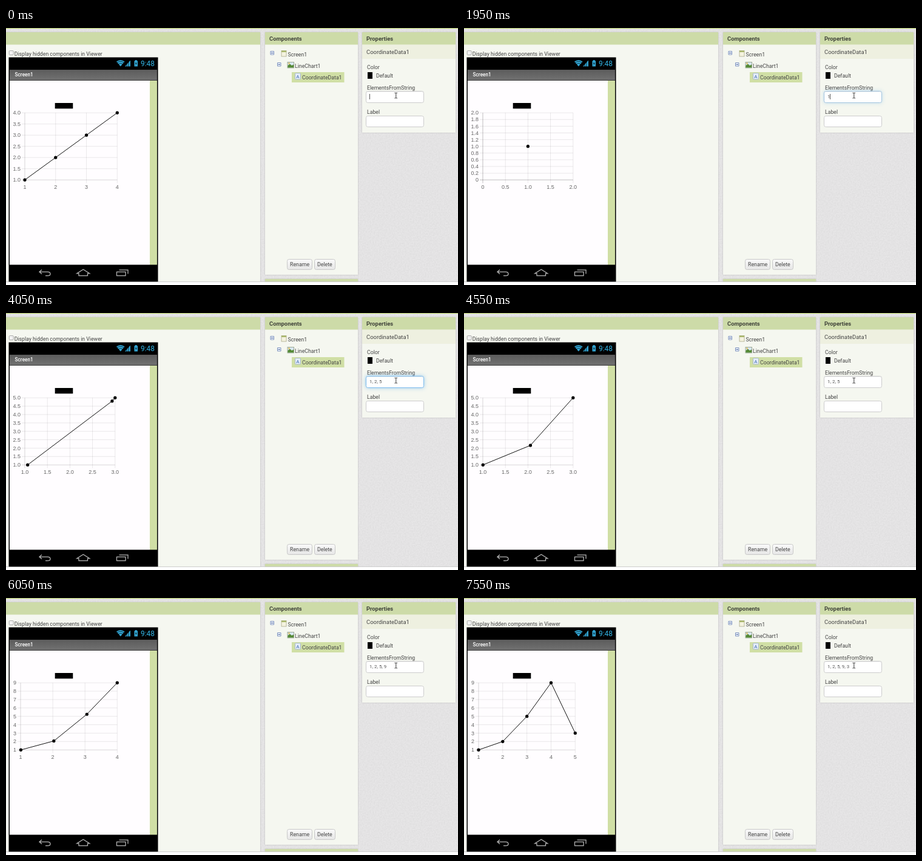
Write an HTML page that moves like this. It is 745x425 px and loops after 8 s.

```html
<!DOCTYPE html>
<html lang="en">
<head>
<meta charset="utf-8">
<title>Line chart designer</title>
<style>
  html, body { margin: 0; width: 100%; height: 100%; overflow: hidden; background: #fff; }
  svg { position: absolute; left: 0; top: 0; }
  text { font: 8.72px Roboto, sans-serif; fill: #444; }
  text.head { font-size: 9.4px; font-weight: 700; fill: #40433a; }
  #chart text { font: 9px "Liberation Sans", Arial, sans-serif; fill: #666; }
  .field {
    position: absolute; left: 593px; width: 96px; height: 19.5px; box-sizing: border-box;
    padding-left: 5px; border: 1px solid #ccc; border-radius: 3.5px; background: #fff;
    font: 7.9px/17.5px Roboto, sans-serif; color: #555; white-space: pre;
  }
  #caret { display: inline-block; width: 0; height: 9px; margin-right: -1px; border-left: 1px solid #555; vertical-align: -1.5px; }
</style>
</head>
<body>
<svg width="745" height="425" viewBox="0 0 745 425">
  <defs>
    <filter id="grain" x="0" y="0" width="100%" height="100%">
      <feTurbulence type="fractalNoise" baseFrequency=".45" numOctaves="2" seed="4"/>
      <feColorMatrix values="0 0 0 0 .4  0 0 0 0 .4  0 0 0 0 .4  .25 0 0 0 -.07"/>
    </filter>
    <filter id="soft" x="-10%" y="-10%" width="120%" height="120%"><feGaussianBlur stdDeviation="1.3"/></filter>
    <linearGradient id="button" x2="0" y2="1"><stop stop-color="#fafafa"/><stop offset="1" stop-color="#e6e6e6"/></linearGradient>
    <linearGradient id="titlebar" x2="0" y2="1"><stop stop-color="#5c5c5c"/><stop offset="1" stop-color="#717171"/></linearGradient>
  </defs>

  <rect width="745" height="420" fill="#e7e6e7"/>
  <rect width="745" height="420" filter="url(#grain)"/>
  <rect width="745" height="1" fill="#b5cf5f"/>
  <g id="panels"></g>
  <path d="M0 419.7H745" stroke="#c9c9c9"/>
  <rect y="420.3" width="745" height="5" fill="#fff"/>

  <rect x="5.2" y="37.6" width="7" height="7" rx="1.2" fill="#f2f2f2" stroke="#999" stroke-width=".8"/>
  <text x="13.7" y="46.1">Display hidden components in Viewer</text>

  <g id="phone">
    <rect x="4.5" y="48.5" width="246" height="371" fill="#000"/>
    <rect x="6" y="69" width="243" height="17.5" fill="url(#titlebar)"/>
    <text x="14.6" y="80.2" style="font-size:8.2px;font-weight:500;fill:#fff">Screen1</text>
    <rect x="6" y="87" width="231" height="304.5" fill="#fffdff"/>
    <rect x="237" y="87" width="12" height="304.5" fill="#d0dfa5"/>
    <g fill="#33a9d8">
      <path d="M182 55.5Q188.7 50.5 195.5 55.5L188.8 63.5Z"/>
      <path d="M196 63.5H205V53.5Z"/>
      <path d="M211.5 54.3H213V53H215.5V54.3H217V63.5H211.5Z"/>
    </g>
    <path d="M183 57.3Q188.7 53.3 194.5 57.3M185 59.8Q188.7 57 192.5 59.8M199 54V64M202 54V64" fill="none" stroke="#000" stroke-width=".7"/>
    <path d="M214.8 55.5L213 59H214.2L213.5 62L215.7 58.3H214.3Z" fill="#000"/>
    <text x="222" y="62.8" style="font-size:11.9px;fill:#33b5e5">9:48</text>
    <g fill="none" stroke="#b4b4b4" stroke-width="1.3">
      <path d="M59 399.8L55 403.3L59 406.8M55.5 403.3H69Q73 403.3 73 406.5T69 409.7H65"/>
      <path d="M117 405.8L127.3 399.3L137.6 405.8H134.5V409.6H120V405.8Z"/>
      <path d="M182.5 403.3H197V409.7H182.5ZM186.5 400.2H201V406.5"/>
    </g>
  </g>
  <rect x="80.7" y="124" width="29.6" height="9.3"/>
  <g id="chart"></g>

  <g id="tree">
    <rect x="471" y="73" width="86.5" height="17" fill="#d0dfa5"/>
    <g fill="#f4f7ff" stroke="#7d92bd">
      <path d="M436 38.5h5.5v5.5h-5.5zM447.5 57.5h5.5v5.5h-5.5z"/>
      <path d="M437 41.3h3.5M448.5 60.3h3.5" stroke="#31528f"/>
    </g>
    <rect x="454" y="37.5" width="8" height="9.5" fill="#f4f3df" stroke="#aaa88b" stroke-width=".8"/>
    <rect x="454" y="37.5" width="8" height="2.4" fill="#a8b66a"/>
    <rect x="464" y="56.5" width="10.5" height="9.5" fill="#d9e7f2" stroke="#8a9a80" stroke-width=".8"/>
    <path d="M464.4 65.6V62L468 59.5L471 62L474 60.5V65.6Z" fill="#558a36"/>
    <circle cx="466.5" cy="58.5" r="1.2" fill="#e7bd4b"/>
    <rect x="476.5" y="74.8" width="9" height="10" rx="1" fill="#e5edf9" stroke="#9eafca" stroke-width=".8"/>
    <text x="478.3" y="82.8" style="font-size:8px;fill:#3865af">A</text>
    <text x="464.6" y="46.7">Screen1</text>
    <text x="476" y="65.7">LineChart1</text>
    <text x="488" y="85.4">CoordinateData1</text>
  </g>

  <g fill="url(#button)" stroke="#c8c8c8">
    <rect x="463.5" y="382.5" width="41" height="17" rx="3"/>
    <rect x="508.5" y="382.5" width="34" height="17" rx="3"/>
  </g>
  <text x="468" y="394" style="font-size:8.8px">Rename</text>
  <text x="513" y="394" style="font-size:8.8px">Delete</text>

  <rect x="587" y="28" width="154" height="23" fill="#eef0e0"/>
  <text x="594" y="43.4" style="font-size:9.44px">CoordinateData1</text>
  <text x="595" y="68.2">Color</text>
  <rect x="596" y="73" width="8" height="11" fill="#000"/>
  <text x="610" y="81.6">Default</text>
  <text x="595" y="101.8">ElementsFromString</text>
  <text x="595" y="142.2">Label</text>
</svg>

<div class="field" id="elements" style="top:104px"><span id="value"></span><span id="caret"></span></div>
<div class="field" style="top:144.5px"></div>

<svg width="745" height="425" style="pointer-events:none">
  <path d="M640.5 107.3H642.3L642.8 107.8L643.3 107.3H645M642.8 107.8V115.5M640.5 116H642.3L642.8 115.5L643.3 116H645" fill="none" stroke="#222" stroke-width=".9"/>
</svg>

<script>
const LOOP = 8000, STEP = 50, EASE_MS = 1000, GLOW_MS = 200, BLINK_MS = 530;
const TOP = 140.2, BOTTOM = 251.2;
const $ = id => document.getElementById(id);
const clamp = v => Math.max(0, Math.min(1, v));

// Each axis is [min, max, step, decimals].
const charts = [
  { start: -LOOP, values: [1, 2, 3, 4],    x: [1, 4, 1, 0],  y: [1, 4, .5, 1] },
  { start: 720,   values: [1],             x: [0, 2, .5, 1], y: [0, 2, .2, 1] },
  { start: 2700,  values: [1, 2],          x: [1, 2, .2, 1], y: [1, 2, .1, 2] },
  { start: 4033,  values: [1, 2, 5],       x: [1, 3, .5, 1], y: [1, 5, .5, 1] },
  { start: 5550,  values: [1, 2, 5, 9],    x: [1, 4, 1, 0],  y: [1, 9, 1, 0] },
  { start: 6718,  values: [1, 2, 5, 9, 3], x: [1, 5, 1, 0],  y: [1, 9, 1, 0] }
];
const focusSpans = [[0, 720], [1850, 2700], [3400, 4033], [4800, 5550], [6200, 6718]];
const keys = [
  [450, "1"],
  [2550, ","], [2600, " "], [2650, "2"],
  [3800, ","], [3850, " "], [3950, "5"],
  [5200, ","], [5300, " "], [5400, "9"],
  [6550, ","], [6600, " "], [6650, "3"]
];

const scale = ([min, max], from, to) => v => from + (v - min) / (max - min) * (to - from);
const ticks = ([min, max, step, digits]) =>
  Array.from({ length: Math.round((max - min) / step) + 1 }, (_, i) => {
    const value = min + i * step;
    return { value, label: value ? value.toFixed(digits) : "0" };
  });

function line(d, alpha) {
  return `<path d="${d}" fill="none" stroke="#000" stroke-opacity="${alpha}" stroke-width=".8"/>`;
}

for (const chart of charts) {
  const left = [24, 31, 36][chart.y[3]], right = chart.x[3] ? 179.8 : 183.3;
  const sx = scale(chart.x, left, right), sy = scale(chart.y, BOTTOM, TOP);
  chart.points = chart.values.map((v, i) => [sx(i + 1), sy(v)]);
  const weight = (value, i) => value === 0 ? .32 : i === 0 ? .2 : .11;
  chart.grid =
    ticks(chart.x).map(({ value, label }, i) => {
      const x = sx(value);
      return line(`M${x} ${TOP}V256.5`, weight(value, i)) +
        `<text x="${x}" y="266.3" text-anchor="middle">${label}</text>`;
    }).join("") +
    ticks(chart.y).map(({ value, label }, i) => {
      const y = sy(value);
      return line(`M${left - 5} ${y}H${right}`, weight(value, i)) +
        `<text x="${left - 7}" y="${y + 3.1}" text-anchor="end">${label}</text>`;
    }).join("");
}

function drawChart(t) {
  const index = charts.findLastIndex(c => c.start <= t);
  const chart = charts[index], before = index ? charts[index - 1].points : chart.points;
  const ease = 1 - (1 - clamp((t - chart.start) / EASE_MS)) ** 4;
  const points = chart.points.map(([x, y], i) => {
    const [x0, y0] = before[i] || [x, y];
    return [x0 + (x - x0) * ease, y0 + (y - y0) * ease];
  });
  $("chart").innerHTML = chart.grid +
    `<polyline points="${points.join(" ")}" fill="none" stroke="#000" stroke-width=".95"/>` +
    points.map(([x, y]) => `<circle cx="${x}" cy="${y}" r="2.6"/>`).join("");
}

function drawField(t) {
  const typed = keys.filter(([at]) => at <= t);
  const focus = focusSpans.find(([from, to]) => t >= from && t < to);
  const glow = Math.max(...focusSpans.map(([from, to]) =>
    Math.min(clamp((t - from) / GLOW_MS), clamp(1 - (t - to) / GLOW_MS))));
  const lastKey = typed.length ? typed[typed.length - 1][0] : 0;
  const caretOn = focus && (t - Math.max(focus[0], lastKey)) % (2 * BLINK_MS) < BLINK_MS;

  $("value").textContent = typed.map(key => key[1]).join("");
  $("caret").style.visibility = caretOn ? "visible" : "hidden";
  const mix = (a, b) => Math.round(a + (b - a) * glow);
  $("elements").style.borderColor = `rgb(${mix(204, 117)},${mix(204, 185)},${mix(204, 240)})`;
  $("elements").style.boxShadow =
    `inset 0 1px 1px rgba(0,0,0,.075), 0 0 6px rgba(82,168,236,${.6 * glow})`;
}

function panel(x, y, w, h, title = "") {
  return `<rect x="${x}" y="${y}" width="${w}" height="${h}" fill="#999" opacity=".6" filter="url(#soft)"/>
    <rect x="${x}" y="${y}" width="${w}" height="${h}" fill="#f5f7f0"/>
    <rect x="${x}" y="${y}" width="${w}" height="${Math.min(h, 20.5)}" fill="#cddba8"/>
    <text class="head" x="${x + 7}" y="20.5">${title}</text>`;
}
$("panels").innerHTML = panel(-20, 7, 439, 413) + panel(427, 7, 153, 401, "Components") +
  panel(427, 415, 153, 5) + panel(587, 7, 154, 166, "Properties");

function frame() {
  const t = Math.floor(performance.now() % LOOP / STEP) * STEP;
  drawChart(t);
  drawField(t);
  requestAnimationFrame(frame);
}
frame();
</script>
</body>
</html>
```
